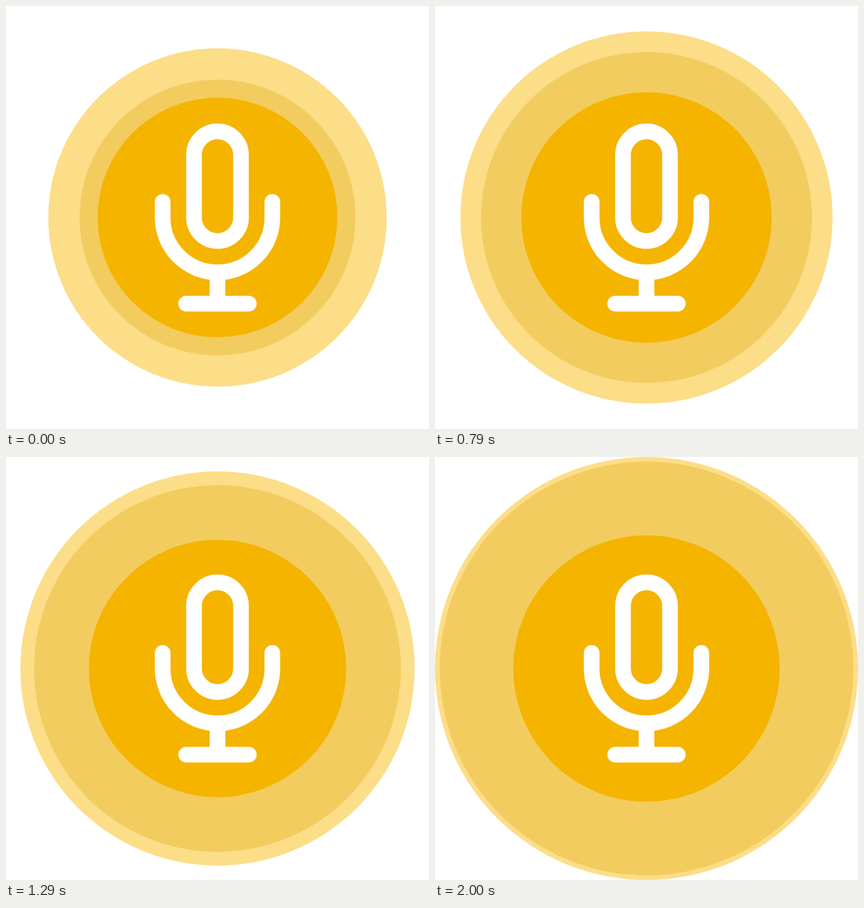
Recreate the animation shown at these times as an HTML page with a canvas. Size 640 by 640 pixels, loop 2.07 s.

```html
<!DOCTYPE html>
<html lang="en">
<head>
<meta charset="utf-8">
<title>Pulsing microphone</title>
<style>
  html, body { margin: 0; width: 100%; height: 100%; overflow: hidden; background: #fff; }
  canvas { display: block; width: 640px; height: 640px; }
</style>
</head>
<body>
<canvas id="stage" width="640" height="640"></canvas>
<script>
const ctx = document.getElementById("stage").getContext("2d");
const SIZE = 640, UNIT = SIZE / 54;
const LOOP = 2070, FPS = 14, LAST = 28;
const TICKS = 50, TICK_RATE = 25;

// Radii in icon units: start, end
const discs = [
  { color: "#fcdd88", from: 21.6, to: 27 },
  { color: "#f2cc5f", from: 17.6, to: 26.4 },
  { color: "#f5b400", from: 15.3, to: 17 }
];

const mic = new Path2D(
  "M-3-8a3 3 0 0 1 6 0V0a3 3 0 0 1-6 0Z" +
  "M-7-2V0A7 7 0 0 0 7 0V-2" +
  "M0 7V11M-4 11H4"
);

const startOf = step => Math.round(step * 100 / FPS) * 10;

// Growth is linear on a 25 Hz clock, shown at 14 steps per second
function progress(time) {
  let step = LAST;
  while (step > 0 && startOf(step) > time + 0.01) step--;
  return Math.ceil(step * TICK_RATE / FPS) / TICKS;
}

function draw(time) {
  const p = progress(time % LOOP);
  ctx.setTransform(1, 0, 0, 1, 0, 0);
  ctx.fillStyle = "#fff";
  ctx.fillRect(0, 0, SIZE, SIZE);
  ctx.setTransform(UNIT, 0, 0, UNIT, SIZE / 2, SIZE / 2);
  for (const { color, from, to } of discs) {
    ctx.fillStyle = color;
    ctx.beginPath();
    ctx.arc(0, 0, from + (to - from) * p, 0, Math.PI * 2);
    ctx.fill();
  }
  ctx.strokeStyle = "#fff";
  ctx.lineWidth = 2;
  ctx.lineCap = ctx.lineJoin = "round";
  ctx.stroke(mic);
}

function loop() {
  draw(performance.now());
  requestAnimationFrame(loop);
}
loop();
</script>
</body>
</html>
```
